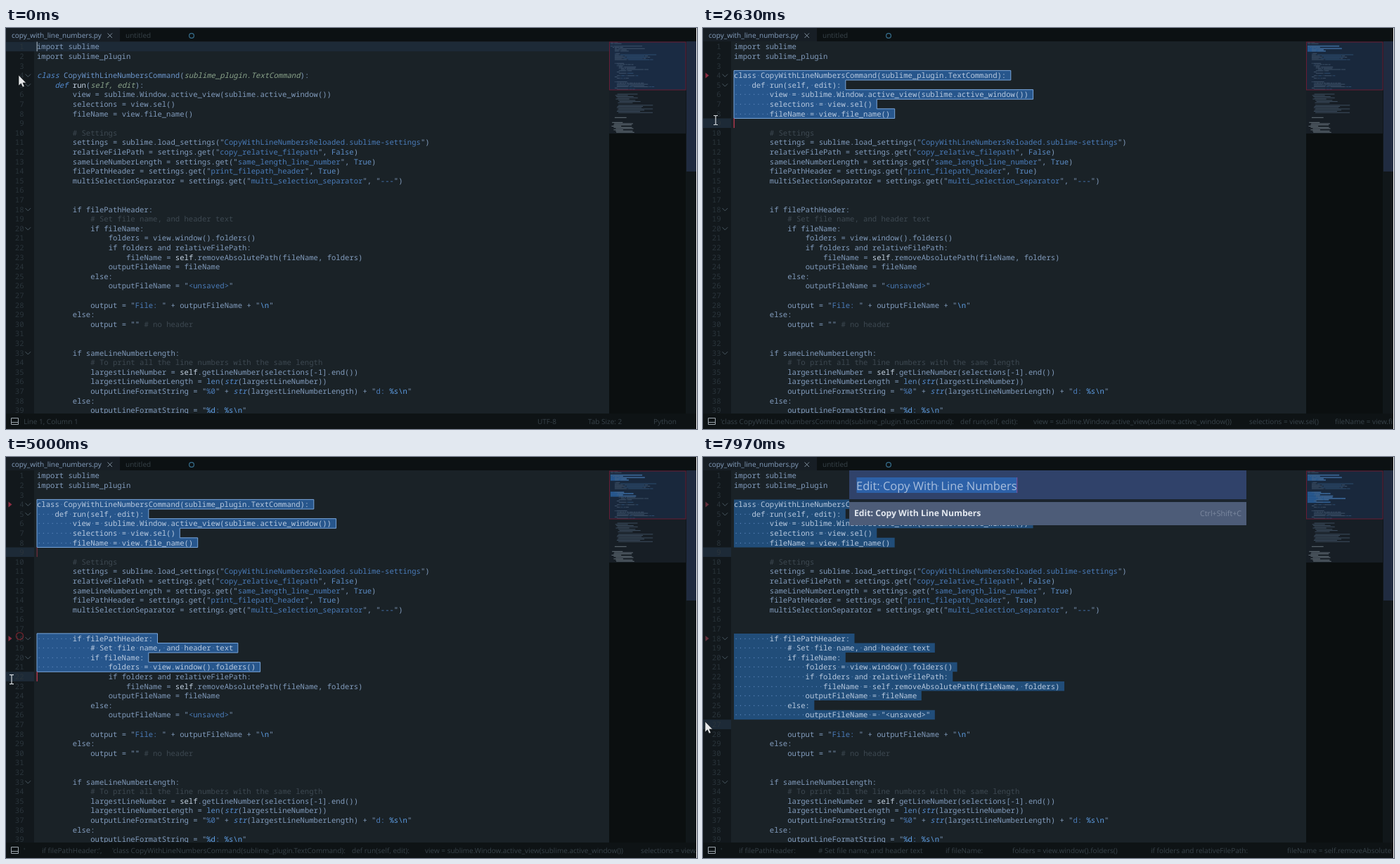
An HTML page that plays this animation: 983 by 570 pixels, repeating every 8000 ms.

```html
<!DOCTYPE html>
<html lang="en">
<head>
<meta charset="utf-8">
<title>Editor selection</title>
<style>
html, body { margin: 0; width: 100%; height: 100%; overflow: hidden; background: #1a2227; }
svg { display: block; width: 983px; height: 570px; text-rendering: geometricPrecision; }
text { white-space: pre; }
.code text { font: 10.587px "Noto Sans Mono", "DejaVu Sans Mono", monospace; fill: #829cbd; }
.code .key { fill: #548bcf; font-style: italic; }
.code .param { fill: #8aa38a; font-style: italic; }
.code .cls { fill: #6d97cd; }
.code .bool { fill: #5b8cc6; }
.code .name { fill: #c6d4e4; }
.code .str { fill: #4a7bb8; }
.code .esc { fill: #5f9fe6; }
.code .note { fill: #3d4851; }
.code .num { fill: #2a343b; text-anchor: end; }
.code .picked { fill: #b9cae0; }
.code .dot { fill: #5c86bb; }
.ui { font: 10px "Open Sans", "Noto Sans", sans-serif; fill: #38434a; }
</style>
</head>
<body>
<svg viewBox="0 0 983 570">
  <rect width="983" height="570" fill="#1a2227"/>
  <rect y="19" width="40" height="529" fill="#12181c"/>
  <g id="under"></g>
  <g id="code" class="code"></g>
  <g id="chrome"></g>
  <g id="over"></g>
</svg>
<script>
const LOOP = 8000, LEFT = 44, CHAR = 6.352, TOP = 19.6, ROW = 13.605;
const PRESS_1 = 1740, PRESS_2 = 4700, RELEASE_2 = 5730, PALETTE = 6860;
const FOLDS = [4, 5, 18, 20, 33];

const source = String.raw`import sublime
import sublime_plugin

class CopyWithLineNumbersCommand(sublime_plugin.TextCommand):
    def run(self, edit):
        view = sublime.Window.active_view(sublime.active_window())
        selections = view.sel()
        fileName = view.file_name()

        # Settings
        settings = sublime.load_settings("CopyWithLineNumbersReloaded.sublime-settings")
        relativeFilePath = settings.get("copy_relative_filepath", False)
        sameLineNumberLength = settings.get("same_length_line_number", True)
        filePathHeader = settings.get("print_filepath_header", True)
        multiSelectionSeparator = settings.get("multi_selection_separator", "---")


        if filePathHeader:
            # Set file name, and header text
            if fileName:
                folders = view.window().folders()
                if folders and relativeFilePath:
                    fileName = self.removeAbsolutePath(fileName, folders)
                outputFileName = fileName
            else:
                outputFileName = "<unsaved>"

            output = "File: " + outputFileName + "\n"
        else:
            output = "" # no header


        if sameLineNumberLength:
            # To print all the line numbers with the same length
            largestLineNumber = self.getLineNumber(selections[-1].end())
            largestLineNumberLength = len(str(largestLineNumber))
            outputLineFormatString = "%0" + str(largestLineNumberLength) + "d: %s\n"
        else:
            outputLineFormatString = "%d: %s\n"`.split("\n");

const byId = id => document.getElementById(id);
const escapeText = s => s.replace(/&/g, "&amp;").replace(/</g, "&lt;");
const span = (kind, s) => `<tspan class="${kind}">${escapeText(s)}</tspan>`;
const rect = (x, y, w, h, fill, extra = "") =>
  `<rect x="${x}" y="${y}" width="${w}" height="${h}" fill="${fill}" ${extra}/>`;
const label = (x, y, s, extra = "") => `<text class="ui" x="${x}" y="${y}" ${extra}>${escapeText(s)}</text>`;
const rowTop = n => TOP + (n - 1) * ROW;
const indentOf = s => s.length - s.trimStart().length;

const TOKEN = /(?<param>(?<=(?:class|def) \w+\()[^)]*)|(?<note>#.*)|(?<str>"[^"]*")|(?<cls>(?<=class )\w+)|\b(?:(?<key>class|def|str)|(?<bool>len|True|False)|(?<name>run|self))\b/g;

function colourString(s) {
  const inner = s.slice(1, -1).split(/(%[ds]|\\n)/)
    .map((part, i) => part && span(i % 2 ? "esc" : "str", part)).join("");
  return `"${inner}"`;
}

function colour(line) {
  let html = "", end = 0;
  for (const m of line.matchAll(TOKEN)) {
    const kind = Object.keys(m.groups).find(k => m.groups[k] !== undefined);
    html += escapeText(line.slice(end, m.index));
    html += kind === "str" ? colourString(m[0]) : span(kind, m[0]);
    end = m.index + m[0].length;
  }
  return html + escapeText(line.slice(end));
}

byId("code").innerHTML = source.map((line, i) => {
  const y = (rowTop(i + 1) + 10.7).toFixed(2), pad = indentOf(line);
  const dotted = escapeText(line).replace(/ +/g, s => span("dot", "·".repeat(s.length)));
  return `<text class="num" x="25.5" y="${y}">${i + 1}</text>` +
    `<g><text x="${LEFT + pad * CHAR}" y="${y}">${colour(line.trimStart())}</text></g>` +
    `<g><text class="picked" x="${LEFT}" y="${y}">${dotted}</text></g>`;
}).join("") + FOLDS.map(n =>
  `<path d="M27.5 ${rowTop(n) + 5.2}l3.8 3.8l3.8 -3.8" fill="none" stroke="#4a5963"/>`).join("");
const rows = [...byId("code").querySelectorAll("g")];

function miniature() {
  const mapX = 860, charW = .74, rowH = 1.75;
  let out = "";
  const mark = (row, col, length, fill) =>
    out += rect((mapX + col * charW).toFixed(1), (20 + row * rowH).toFixed(1), (length * charW).toFixed(1), 1, fill, 'opacity=".6"');
  source.forEach((line, i) => {
    for (const m of line.matchAll(/\S+/g)) mark(i, m.index, m[0].length, /[#"]/.test(m[0]) ? "#3b648f" : "#566c84");
  });
  // first row, last row, indent, longest line
  for (const [a, b, pad, long] of [[42, 46, 8, 50], [47, 49, 12, 55], [51, 57, 10, 80], [61, 61, 4, 32], [65, 69, 2, 42], [70, 73, 6, 44]])
    for (let r = a; r <= b; r++) {
      const wave = Math.abs(Math.sin(r * 7.3));
      mark(r, pad + Math.round(wave * 5), (long - pad) * (.45 + .5 * wave), r > 60 ? "#9aa8b5" : "#566c84");
    }
  return out;
}

byId("chrome").innerHTML =
  rect(0, 0, 983, 19, "#0c1113") + rect(0, 0, 162, 19, "#171e25") +
  label(8, 13.8, "copy_with_line_numbers.py", 'style="fill:#86a0c0"') +
  '<path d="M144.5 7.5l6.5 6.5m0 -6.5l-6.5 6.5" stroke="#7f8f9e"/>' +
  label(170, 13.8, "untitled") +
  '<circle cx="264" cy="11" r="3.4" fill="none" stroke="#37708f" stroke-width="1.2"/>' +
  rect(858, 19, 109, 131, "#171e25") + rect(858, 150, 109, 398, "#0b0f10") +
  rect(967, 19, 15, 529, "#11171a") + rect(968, 19, 14, 185, "#202b40") +
  '<g id="mini"></g>' + miniature() +
  rect(858.5, 20, 108.5, 68, "none", 'stroke="#681d34"') +
  rect(0, 548, 983, 22, "#0e1315") +
  '<path d="M7.5 554.5h10v9h-10zM7.5 560.5h10" fill="none" stroke="#9ca5ac"/>' +
  '<g id="status"></g>' + rect(982, 0, 1, 570, "#fff");

// time, x, y
const POINTER = [[0, 18, 67], [PRESS_1, 18, 67], [2480, 18, 131], [2750, 18, 131], [4250, 21, 252],
  [4600, 21, 252], [5000, 8, 316], [5640, 5, 374], [RELEASE_2, 3, 376], [LOOP, 3, 376]];

function pointerAt(t) {
  const i = Math.max(1, POINTER.findIndex(p => p[0] >= t));
  const [a, b] = [POINTER[i - 1], POINTER[i]];
  const k = (t - a[0]) / (b[0] - a[0]);
  return [a[1] + (b[1] - a[1]) * k, a[2] + (b[2] - a[2]) * k];
}

const rowAtPointer = t => Math.floor((pointerAt(t)[1] - 21.5) / ROW) + 1;

function selectionsAt(t) {
  const list = [];
  if (t >= PRESS_1) list.push([4, rowAtPointer(Math.min(t, 2600)) - 1]);
  if (t >= PRESS_2) list.push([18, rowAtPointer(Math.min(t, RELEASE_2)) - 1]);
  return list;
}

function outline([first, last], focused) {
  if (last < first) return "";
  let d = `M${LEFT} ${rowTop(first)}`;
  for (let n = first; n <= last; n++)
    d += `H${LEFT + (source[n - 1].length + 1) * CHAR}V${rowTop(n + 1)}`;
  return `<path d="${d}H${LEFT}Z" fill="${focused ? "#27568c" : "#214d79"}" stroke="${focused ? "#79a6dc" : "none"}" stroke-linejoin="round"/>`;
}

// On for 400 ms, fades out, rests, fades in again each second.
function blink(ms) {
  const p = ((ms % 1000) + 1000) % 1000;
  if (p < 400) return 1;
  if (p < 600) return 1 - (p - 400) / 200;
  return p < 850 ? 0 : Math.min(1, (p - 850) / 130);
}

function caretOpacity(t) {
  if (t < PRESS_1) return blink(t);
  if (t < 2600) return 1;
  if (t < PRESS_2) return blink(t - 2600);
  return t < 6460 ? 1 : blink(t - 6060);
}

const caret = (x, y, h, opacity, fill) => rect(x, y, 1.4, h, fill, `opacity="${opacity.toFixed(2)}"`);

function statusAt(t) {
  let parts;
  if (t < PRESS_1) parts = [[25, "Line 1, Column 1"], [756, "UTF-8"], [828, "Tab Size: 2"], [921, "Python"]];
  else {
    const body = [[0, "'class CopyWithLineNumbersCommand(sublime_plugin.TextCommand):"], [341, "def run(self, edit):"],
      [445, "view = sublime.Window.active_view(sublime.active_window())"], [752, "selections = view.sel()"],
      [874, "fileName = view.file_name()"]];
    const shifted = x => body.map(([dx, s]) => [x + dx, s]);
    if (t < PRESS_2) parts = shifted(25);
    else if (t < 5200) parts = [[25, "'"], [51, "if filePathHeader:',"], ...shifted(151)];
    else parts = [[25, "'"], [51, "if filePathHeader:"], [164, "# Set file name, and header text"], [345, "if fileName:"],
      [440, "folders = view.window().folders()"], [637, "if folders and relativeFilePath:"], [831, "fileName = self.removeAbsolute"]];
  }
  return parts.map(([x, s]) => label(x, 563, s)).join("");
}

function ripple(t, start, end, x, y) {
  if (t < start || t > end) return "";
  const k = (t - start) / (end - start);
  return `<circle cx="${x}" cy="${y}" r="${19.3 * k}" fill="none" stroke="#a12c36" stroke-width="1.5" opacity="${.45 + .45 * k}"/>`;
}

function pointer(t) {
  const [x, y] = pointerAt(t);
  const beam = (t >= PRESS_1 && t < 2750) || (t >= PRESS_2 && t < 6030);
  const shape = beam
    ? '<path d="M-3 -6.5h2.2l.8 .8l.8 -.8h2.2M-3 6.5h2.2l.8 -.8l.8 .8h2.2M0 -6v12" fill="none" stroke="#d5dade" stroke-width="1.2"/>'
    : '<path d="M0 0V15l3.4 -3.2l2.3 5.2l2.5 -1.1l-2.2 -5H10.6Z" fill="#e6e8ea" stroke="#15191c" stroke-width=".6"/>';
  return `<g transform="translate(${x} ${y})">${shape}</g>`;
}

function palette(t) {
  const title = "Edit: Copy With Line Numbers";
  return rect(208, 19, 565, 78, "#1b242e") + rect(208, 19, 565, 41, "#30426a") +
    rect(208, 64, 565, 33, "#4d5c78") + rect(218.5, 29, 228.5, 22, "#2d61a8") +
    label(218, 46.5, title, 'style="font-size:16.5px;fill:#a8bedd"') +
    [256, 297, 337, 378].map(x => `<circle cx="${x - 2.5}" cy="41" r=".8" fill="#7b9fd0"/>`).join("") +
    caret(446, 29, 22, blink(t - 7050), "#9b4a9c") +
    label(215, 84.4, title, 'style="font-size:12.2px;font-weight:700;fill:#e3e8ef"') +
    label(707, 83.7, "Ctrl+Shift+C", 'style="font-size:10.7px;fill:#7c89a0"');
}

function render(t) {
  const focused = t < PALETTE;
  const picks = selectionsAt(t);
  const active = picks.length ? picks.map(([, last]) => last + 1) : [1];

  byId("under").innerHTML =
    active.map(n => rect(0, rowTop(n), picks.length ? 40 : 858, ROW, "#1d2a37")).join("") +
    picks.map(p => outline(p, focused)).join("");

  source.forEach((line, i) => {
    const picked = picks.some(([a, b]) => i + 1 >= a && i + 1 <= b);
    rows[2 * i].style.display = picked ? "none" : "";
    rows[2 * i + 1].style.display = picked ? "" : "none";
  });

  byId("mini").innerHTML = rect(858, 20, 109, 68, "#1d3a68", `opacity="${picks.length ? .35 : .45}"`) +
    picks.map(([a, b]) => Array.from({ length: Math.max(0, b - a + 1) }, (_, i) =>
      rect(860, 19.6 + (a + i - 1) * 1.75, source[a + i - 1].length * .74, 1.75, "#285b94")).join("")).join("");
  byId("status").innerHTML = statusAt(t);

  const opacity = caretOpacity(t);
  byId("over").innerHTML =
    picks.map(([a]) => `<path d="M3.5 ${rowTop(a) + 3.2}l5 4l-5 4z" fill="${focused ? "#8b2e42" : "#64303c"}"/>`).join("") +
    (focused ? active.map((n, i) => caret(43.5, rowTop(n), ROW, opacity * (i < active.length - 1 ? .5 : 1),
      picks.length ? "#b5384f" : "#8a97a5")).join("") : "") +
    ripple(t, 1660, 2520, 18, 68) + ripple(t, 4740, RELEASE_2, 19.5, 254.5) +
    (focused ? "" : palette(t)) + pointer(t);
}

const start = performance.now();
function tick() {
  render((performance.now() - start) % LOOP);
  requestAnimationFrame(tick);
}
tick();
</script>
</body>
</html>
```
